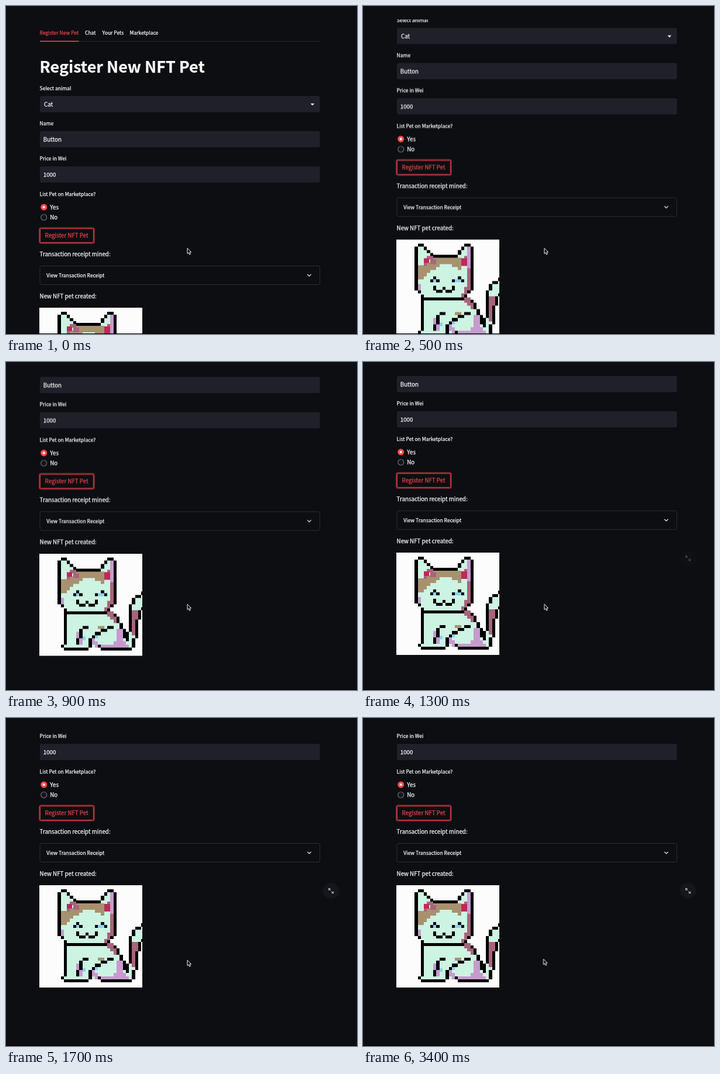
Animation of 600 by 561 pixels, one loop 3500 ms. Source, as an HTML page:

```html
<!DOCTYPE html>
<html lang="en">
<head>
<meta charset="utf-8">
<title>Register New NFT Pet</title>
<style>
  html, body { margin: 0; width: 100%; height: 100%; overflow: hidden; background: #0d0e12; }
  svg { display: block; }
  text {
    font-family: "Noto Sans CJK JP", "Noto Sans CJK SC", "Noto Sans CJK KR", "Noto Sans CJK", "Noto Sans", sans-serif;
    font-size: 9.75px;
    fill: #fafafa;
    stroke: #fafafa;
    stroke-width: .25px;
  }
  .label { font-size: 8.53px; }
  .title { font-size: 26.9px; font-weight: 700; }
  .red { fill: #e8434a; stroke: #e8434a; }
  .field { fill: #1f2029; }
  .line { fill: none; stroke: #fafafa; stroke-width: 1.2; }
  .ink { fill: none; stroke: #000; stroke-width: 1; stroke-linecap: square; }

  .page, .expand, .cursor { animation: 3.5s step-end infinite; }
  .page { animation-name: scroll; }
  .expand { animation-name: reveal; }
  .cursor { animation-name: nudge; }

  /* Three swipes, each coasting to rest, on a 100 ms clock */
  @keyframes scroll {
    0% { transform: translateY(0); }
    2.85% { transform: translateY(-52px); }
    5.71% { transform: translateY(-92.5px); }
    8.57% { transform: translateY(-107px); }
    11.42% { transform: translateY(-113.5px); }
    14.28% { transform: translateY(-116.5px); }
    17.14% { transform: translateY(-118px); }
    19.99% { transform: translateY(-119.5px); }
    22.85% { transform: translateY(-158px); }
    25.71% { transform: translateY(-188.5px); }
    37.14% { transform: translateY(-190px); }
    39.99% { transform: translateY(-198px); }
    42.85% { transform: translateY(-208px); }
    45.71% { transform: translateY(-221px); }
    48.57%, 100% { transform: translateY(-230px); }
  }
  @keyframes reveal {
    0% { opacity: 0; }
    37.14% { opacity: .35; }
    39.99% { opacity: .75; }
    42.85%, 100% { opacity: 1; }
  }
  @keyframes nudge {
    0% { transform: translate(310px, 414.2px); }
    94.28% { transform: translate(309px, 413.2px); }
    97.14%, 100% { transform: translate(308.4px, 412.2px); }
  }
</style>
</head>
<body>
<svg width="600" height="561" viewBox="0 0 600 561">
  <defs>
    <clipPath id="photo"><rect x="57.8" y="516.3" width="174.4" height="174.4"/></clipPath>
  </defs>
  <rect width="600" height="561" fill="#0d0e12"/>

  <g class="page">
    <!-- Tabs -->
    <g>
      <text class="label red" x="57.6" y="49.4">Register New Pet</text>
      <text class="label" x="135" y="49.4">Chat</text>
      <text class="label" x="164.6" y="49.4">Your Pets</text>
      <text class="label" x="211.6" y="49.4">Marketplace</text>
    </g>
    <rect x="58" y="60" width="479" height="1" fill="#24262d"/>
    <rect x="58" y="59.6" width="66.5" height="1.5" fill="#ff4b4b"/>

    <text class="title" x="57.6" y="114.3">Register New NFT Pet</text>

    <!-- Form -->
    <text class="label" x="57.6" y="143.8">Select animal</text>
    <rect class="field" x="58" y="154" width="478.6" height="27.8" rx="2.5"/>
    <text x="65" y="171.8">Cat</text>
    <path d="M520.6 166.7h6.6l-3.3 3.5z" fill="#fafafa"/>

    <text class="label" x="57.6" y="204">Name</text>
    <rect class="field" x="58" y="214" width="478.6" height="27.8" rx="2.5"/>
    <text x="63.8" y="231.8">Button</text>

    <text class="label" x="57.6" y="264.2">Price in Wei</text>
    <rect class="field" x="58" y="274.3" width="478.6" height="27.8" rx="2.5"/>
    <text x="63.8" y="292">1000</text>

    <text class="label" x="57.6" y="324.5">List Pet on Marketplace?</text>
    <circle cx="64.7" cy="344" r="5.5" fill="#ff4b4b"/>
    <circle cx="64.7" cy="344" r="2.1" fill="#fff"/>
    <text x="75.3" y="347.5">Yes</text>
    <circle cx="64.7" cy="361.5" r="5" fill="#14151b" stroke="#6b6c73" stroke-width="1.2"/>
    <text x="75.3" y="365">No</text>

    <rect x="57" y="379.4" width="93.8" height="26.4" rx="3" fill="none" stroke="#8a2c30" stroke-width="2"/>
    <rect x="58.4" y="380.8" width="91" height="23.6" rx="2" fill="#0d0e12" stroke="#e8434a"/>
    <text class="red" x="66.6" y="396.1">Register NFT Pet</text>

    <!-- Result -->
    <text x="57.6" y="428">Transaction receipt mined:</text>
    <rect x="58" y="444.5" width="478.5" height="32" rx="3" fill="none" stroke="#2b2d34"/>
    <text class="label" x="69.3" y="463.8">View Transaction Receipt</text>
    <path class="line" d="M515.2 458.8l3.2 3.2 3.2-3.2"/>
    <text x="57.6" y="500">New NFT pet created:</text>

    <!-- Pixel cat, one unit per cell -->
    <g clip-path="url(#photo)">
      <rect x="57" y="516" width="176" height="176" fill="#fdfcfd"/>
      <g transform="translate(88.2 523) scale(5.3 5.31)" shape-rendering="crispEdges">
        <g fill="#cdf3e2">
          <path d="M1 1h2v1h1v1h1v1h9v-1h1v-1h1v-1h2v15h-2v1.5H3v-1.5H1z"/>
          <path d="M3 18H18v1h1v2h1v2h1v3h1v3H2v-1h1z"/>
          <path d="M24 15h1v-2h3v3h-1v1h-1v3h-1v6h-1v3h-3v-2h2v-3h1z"/>
        </g>
        <path fill="#a8916f" d="M1 7h2V6h3V4.5h9v4h-1v-1h-2v-1H8v1H7v1H5v1H4v1H3v1H1zM13 22h2v1h-2z"/>
        <g fill="#a5657c">
          <path d="M4 4h2v1h1v1.5H5V5H4zM16 4h1v1.5h-1zM3 6.2h1v1H3z"/>
          <path d="M17 8h1v8h-1v1.3h-2V16h1v-2h1zM16 17.3h2V19h1v2h-1v-1h-1v-1h-1z"/>
          <path d="M24 17h2v3h-1v5h-1z"/>
        </g>
        <g fill="#c79ace">
          <path d="M17 1h1v7h-1zM1 13h1v2H1z"/>
          <path d="M19 23h2v4h1v1h1v1h-9v-1h4v-1h1z"/>
          <path d="M6 24h1v2H6zM7 26h1v2H7zM11 26h1v2h-1zM12 27h1v1h1v1h-2z"/>
        </g>
        <path fill="#bf285a" d="M3 4.7h1.6v1.5H3zM15 4.8h2v2.4h-2z"/>
        <path fill="#8fd0f0" d="M6 11.5h1v1H6zM13 11.5h2v1h-2zM8 25.5h1v1H8zM12 25h1v1h-1z"/>
        <g class="ink" transform="translate(.5 .5)">
          <path d="M0 1V14M1 0h1M3 1h0M4 2h0M5 3h0M6 3.5H13M14 2.5V2M15 1h0M16 0h1M18 1V14"/>
          <path d="M1 15h0M2 16.3h0M3 17.3H15M17 15h0M16 16.3h0"/>
          <path d="M6 10.5h0M5 11.5h0M7 11.5h0M14 10.5h0M12 11.5h0M15 11.5h0"/>
          <path d="M6 13.5v.5M7 14.8h1M9 13.9h0M10 14.8h1M12 13.5v.5"/>
          <path d="M2 17.3V27M1 28h0M2 29h7M10 28h0M13 28h0M14 29h9"/>
          <path d="M18 18h0M19 19v1M20 21v1M21 23v2"/>
          <path d="M8 22h1M7 23v2M6 26v1M10 26v1M11 25h0M12 24h1M14 23h1M16 22h1"/>
          <path d="M22 24v2M23 15V23M24 13v1M25 12h1M27 11h1M27 16h1M26 17v2M25 20v5M24 26v2"/>
        </g>
      </g>
    </g>

    <g class="expand">
      <circle cx="555.6" cy="525.7" r="13.6" fill="#15161b"/>
      <path d="M551 525.4v-4.3h4.3zM560.2 526v4.3h-4.3z" fill="#a3a4a8"/>
      <path d="M552 522l3 3M559.2 529.4l-3-3" stroke="#a3a4a8" stroke-width="1.3"/>
    </g>
  </g>

  <rect width="600" height="23" fill="#0d0e12"/>
  <rect y="560" width="600" height="1" fill="#000"/>

  <g class="cursor">
    <path d="M0 0v9.4l2.1-2 1.5 3.5 1.7-.7-1.5-3.4 2.9-.1z" fill="#08080a" stroke="#f2f2f2"/>
  </g>
</svg>
</body>
</html>
```
